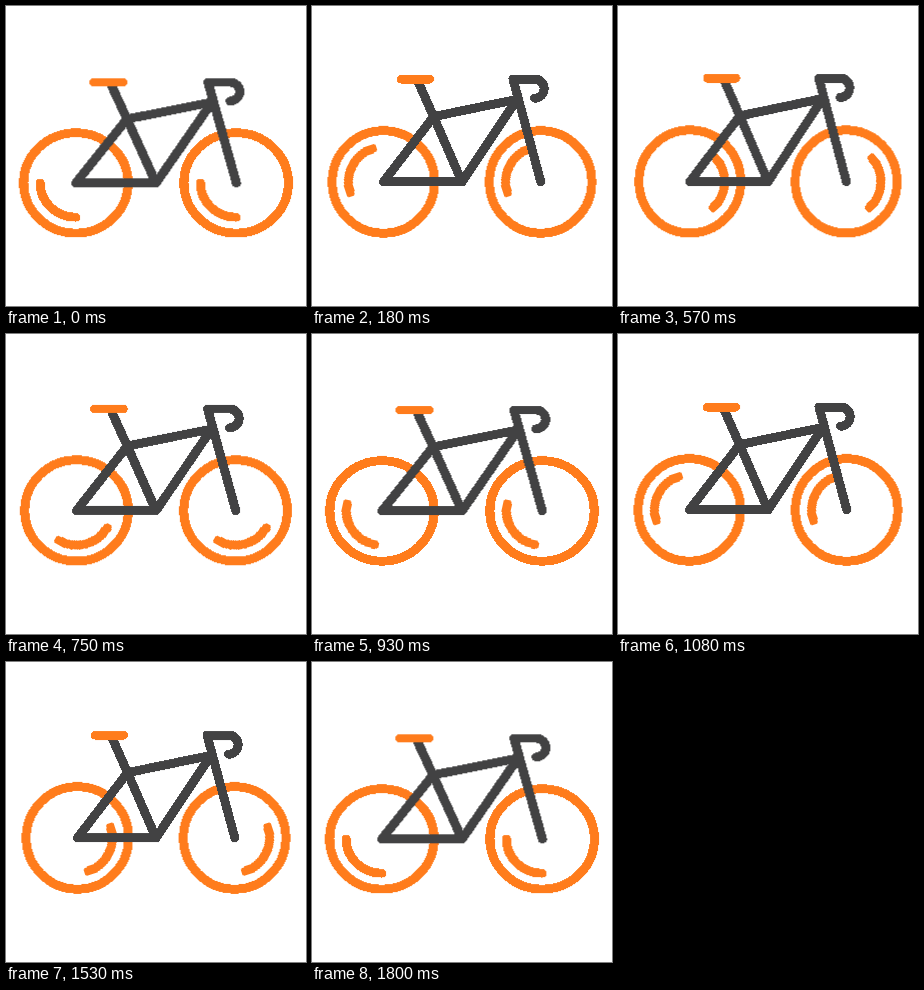
Write an HTML page that moves like this. It is 300x300 px and loops after 1830 ms.

```html
<!DOCTYPE html>
<html lang="en">
<head>
<meta charset="utf-8">
<title>Rolling bicycle</title>
<style>
  html, body { margin: 0; width: 100%; height: 100%; overflow: hidden; background: #fff; }
  svg { display: block; width: 100vw; height: 100vh; }

  .bike {
    fill: none;
    stroke-width: 9;
    stroke-linecap: round;
    stroke-linejoin: round;
    shape-rendering: crispEdges;
    transform-origin: 150px 231px;
    animation: squash 1830ms infinite;
  }
  .accent { stroke: #ff7c1c; }
  .frame { stroke: #424243; }
  .glint { transform-origin: 0 0; animation: spin 1830ms infinite; }

  /* Two turns and two squashes in 1800 ms, then a 30 ms hold */
  @keyframes spin {
    0% { transform: rotate(0deg); animation-timing-function: steps(60); }
    98.36%, 100% { transform: rotate(720deg); }
  }
  @keyframes squash {
    0%, 49.18%, 98.36%, 100% {
      transform: scale(1.02, .98);
      animation-timing-function: cubic-bezier(.35, .1, .65, .9);
    }
    19.67%, 68.85% {
      transform: scale(.98, 1.02);
      animation-timing-function: cubic-bezier(.35, .1, .65, .9);
    }
  }
</style>
</head>
<body>
<svg viewBox="0 0 300 300">
  <g class="bike">
    <g class="accent" transform="translate(71.4 175.9)">
      <circle r="51.2"/>
      <path class="glint" d="M-35 0A35 35 0 0 0 0 35"/>
    </g>
    <g class="accent" transform="translate(228.6 175.9)">
      <circle r="51.2"/>
      <path class="glint" d="M-35 0A35 35 0 0 0 0 35"/>
    </g>
    <g class="frame">
      <path d="M106.6 77L121.6 110.6L150 175.9H71.4L121.6 110.6L204.9 93.4L150 175.9"/>
      <path d="M228.8 175.9L201 73.1H222.6A9.55 9.55 0 0 1 222.6 92.2"/>
    </g>
    <path class="accent" d="M89.2 73.1H117.6"/>
  </g>
</svg>
</body>
</html>
```
